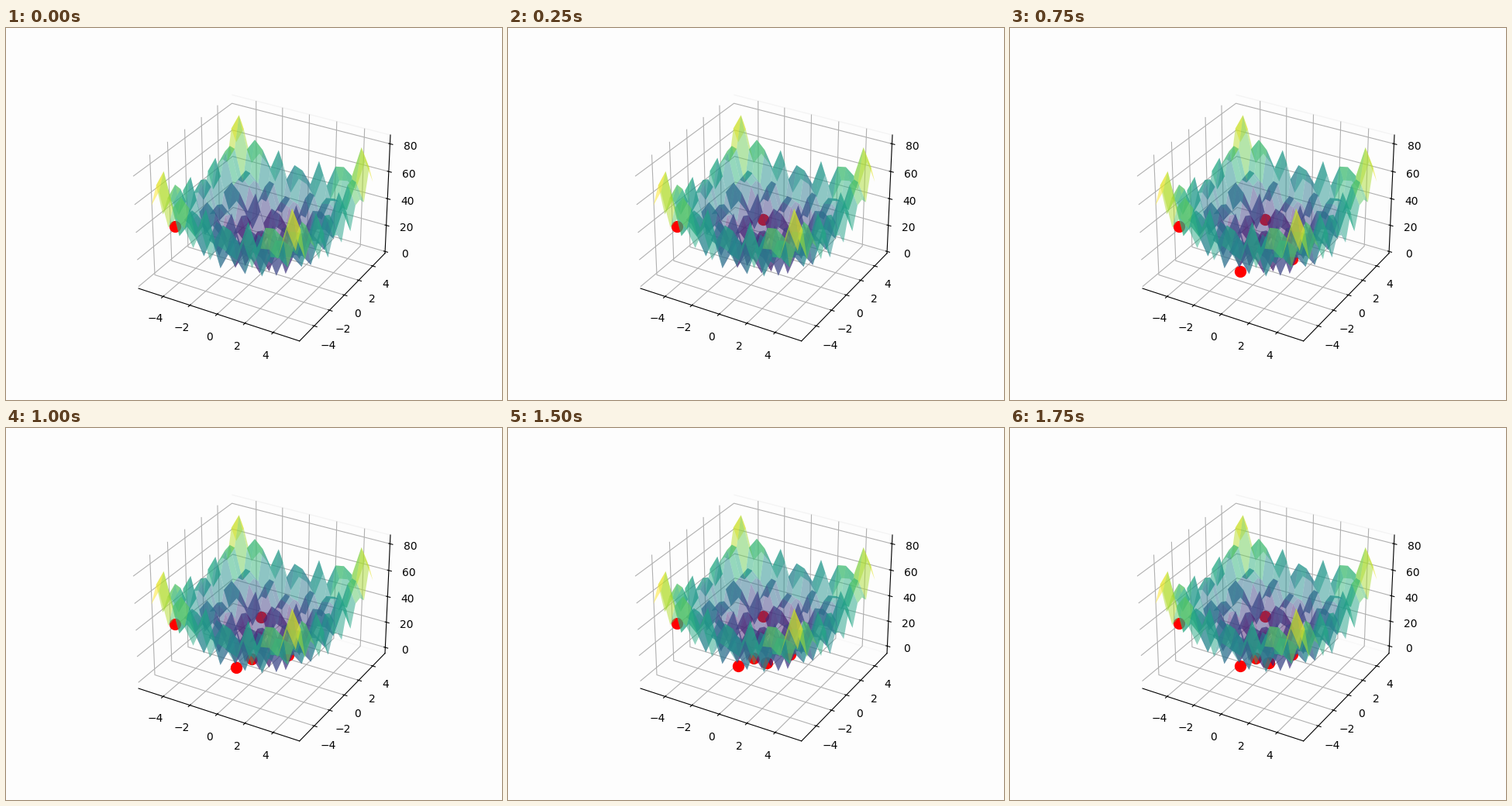
Recreate the animation shown at these times as a matplotlib script. Size 640 by 480 pixels, loop 2000 ms.

```python
import numpy as np
import matplotlib.pyplot as plt
from matplotlib.animation import FuncAnimation

FRAMES, INTERVAL = 8, 250
PAPER = "#fdfdfd"


def rastrigin(x, y):
    return 20 + sum(v**2 - 10 * np.cos(2 * np.pi * v) for v in (x, y))


# a few wide search steps, then a damped swing into the global minimum
steps = [(-4.014, -4.213), (-1.112, 1.502), (1.861, -0.206),
         (-0.93, -1.965), (-0.975, -0.01)]
steps += [(0.03 * (-0.4)**k, 0) for k in range(FRAMES - len(steps))]
path = np.array(steps)

side = np.arange(-5.12, 5.12, 0.6)
X, Y = np.meshgrid(side, side)
Z = rastrigin(X, Y)

fig = plt.figure(figsize=(6.4, 4.8), dpi=100, facecolor=PAPER)
ax = fig.add_subplot(projection="3d")


def draw(i):
    ax.clear()
    ax.set_facecolor(PAPER)
    ax.set_zmargin(0)
    for axis in (ax.xaxis, ax.yaxis, ax.zaxis):
        axis.pane.set_facecolor(PAPER)
        axis.pane.set_edgecolor(PAPER)
    ax.yaxis.pane.set_edgecolor("#ececec")
    ax.plot_surface(X, Y, Z, cmap="viridis", alpha=0.5)
    x, y = path[:i + 1].T
    ax.scatter(x, y, rastrigin(x, y), color="red", s=100, depthshade=False)
    return []


anim = FuncAnimation(fig, draw, frames=FRAMES, init_func=lambda: [],
                     interval=INTERVAL, repeat=True, repeat_delay=0)
plt.show()
```
